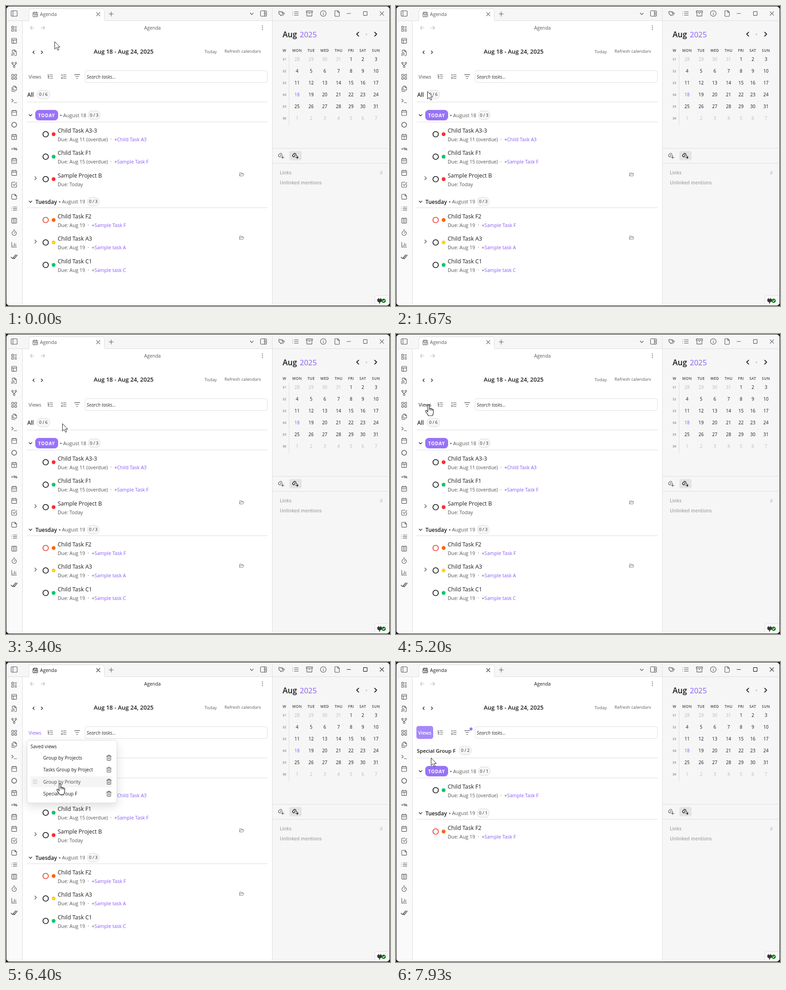
An HTML page that plays this animation: 847 px wide and 661 px high, repeating every 8000 ms.

```html
<!DOCTYPE html>
<html lang="en">
<head>
<meta charset="utf-8">
<title>Agenda</title>
<style>
  html, body { margin: 0; width: 100%; height: 100%; overflow: hidden; background: #1b1b1b; }
  svg { display: block; font-family: "Open Sans", "Noto Sans", sans-serif; }
  .icon { fill: none; stroke-linecap: round; stroke-linejoin: round; }
</style>
</head>
<body>
<svg id="stage" width="847" height="661" viewBox="0 0 847 661"></svg>
<script>
const INK = '#1c1c1c', GREY = '#565656', PALE = '#bbb', LINE = '#dedede', ACCENT = '#8a5cf5', PILL = '#9873f7';
const RED = '#fb2c36', GREEN = '#00c968', ORANGE = '#fb6514', YELLOW = '#fdcf2b';

// Drawing helpers; text is placed by the middle of its capitals
const text = (x, y, str, size, color = INK, weight = 400, extra = '') =>
  `<text x="${x}" y="${y + size * .36}" font-size="${size}" fill="${color}" font-weight="${weight}" ${extra}>${str}</text>`;
const centred = (x, y, str, size, color, weight, extra = '') =>
  text(x, y, str, size, color, weight, `text-anchor="middle" ${extra}`);
const rect = (x, y, w, h, fill, r = 0, stroke = 'none') =>
  `<rect x="${x}" y="${y}" width="${w}" height="${h}" fill="${fill}" rx="${r}" stroke="${stroke}"/>`;
const circle = (x, y, r, fill, stroke = 'none', width = 1) =>
  `<circle cx="${x}" cy="${y}" r="${r}" fill="${fill}" stroke="${stroke}" stroke-width="${width}"/>`;
const path = (d, color = LINE, width = 1) =>
  `<path class="icon" d="${d}" stroke="${color}" stroke-width="${width}"/>`;
const hline = (x1, x2, y) => path(`M${x1} ${y}H${x2}`);
const group = (id, body) => `<g id="${id}">${body}</g>`;

// Icons live on a 24 unit grid
const ring = (x, y, r) => `M${x - r} ${y}a${r} ${r} 0 1 0 ${2 * r} 0a${r} ${r} 0 1 0 ${-2 * r} 0`;
const box = (x, y, w, h, r = 2) =>
  `M${x + r} ${y}h${w - 2 * r}a${r} ${r} 0 0 1 ${r} ${r}v${h - 2 * r}a${r} ${r} 0 0 1 ${-r} ${r}` +
  `h${2 * r - w}a${r} ${r} 0 0 1 ${-r} ${-r}v${2 * r - h}a${r} ${r} 0 0 1 ${r} ${-r}z`;
const calendar = box(3, 4, 18, 18) + 'M3 10h18M8 2v4M16 2v4';
const ICONS = {
  rows: box(3, 3, 7, 7, 1) + box(3, 14, 7, 7, 1) + 'M14 4h7M14 9h7M14 15h7M14 20h7',
  layout: box(3, 3, 18, 18) + 'M3 9h18M9 9v12',
  search: 'M14 2v6h6M5 9V4a2 2 0 0 1 2-2h8l5 6v12a2 2 0 0 1-2 2h-4' + ring(8, 16, 4) + 'M5 19l-3 3',
  fork: ring(6, 6, 3) + ring(18, 6, 3) + ring(12, 19, 3) + 'M6 9c0 4 6 3 6 7c0-4 6-3 6-7',
  grid: box(3, 3, 7, 7, 1) + box(14, 3, 7, 7, 1) + box(3, 14, 7, 7, 1) + box(14, 14, 7, 7, 1),
  files: 'M15 2H10a2 2 0 0 0-2 2v11a2 2 0 0 0 2 2h9a2 2 0 0 0 2-2V7zM15 2v5h6M4 7v13a2 2 0 0 0 2 2h10',
  terminal: 'M3 17l6-5.5L3 6M12 19h9',
  calendar,
  days: calendar + 'M8 14h.1M12 14h.1M16 14h.1M8 18h.1M12 18h.1M16 18h.1',
  check: 'M21 11v8a2 2 0 0 1-2 2H5a2 2 0 0 1-2-2V5a2 2 0 0 1 2-2h11M8 11l4 4L22 4',
  note: 'M15 3H5a2 2 0 0 0-2 2v14a2 2 0 0 0 2 2h14a2 2 0 0 0 2-2V9zM15 3v6h6',
  list: 'M8 6h14M8 12h14M8 18h14M2 6h.1M2 12h.1M2 18h.1',
  columns: box(3, 3, 18, 18) + 'M9 3v18M15 3v18',
  timer: ring(12, 14, 8) + 'M10 2h4M12 14l3-3',
  chart: 'M3 3v18h18M8 17v-3M13 17V6M18 17V10',
  ticks: 'M1 14l5 5L18 5M9 17l3 3L23 6',
  left: box(2, 3, 20, 18, 3) + 'M8 3v18',
  right: box(2, 3, 20, 18, 3) + 'M15 3v18M18 7v10',
  clock: 'M21 8V6a2 2 0 0 0-2-2H5a2 2 0 0 0-2 2v14a2 2 0 0 0 2 2h4M3 10h6M8 2v4M16 2v4' + ring(16, 16, 6) + 'M16 13v3l2 1',
  close: 'M5 5l14 14M19 5L5 19',
  plus: 'M12 4v16M4 12h16',
  minus: 'M5 12h14',
  square: box(5, 5, 14, 14, 1),
  down: 'M5 9l7 7 7-7',
  prev: 'M15 5l-7 7 7 7',
  next: 'M9 5l7 7-7 7',
  back: 'M20 12H4M11 5l-7 7 7 7',
  forth: 'M4 12h16M13 5l7 7-7 7',
  tags: 'M2 5h7l8 7-7 8-8-8zM13 5l9 7-7 8M6 9h.1',
  archive: box(1, 3, 22, 5, 1) + 'M3 8v12a1 1 0 0 0 1 1h16a1 1 0 0 0 1-1V8M10 12h4',
  info: ring(12, 12, 10) + 'M12 11v6M12 7h.1',
  file: 'M14 2H6a2 2 0 0 0-2 2v16a2 2 0 0 0 2 2h12a2 2 0 0 0 2-2V8zM14 2v6h6',
  tree: 'M10 5h12M13 12h9M13 19h9M2 5h4M4 5v12a2 2 0 0 0 2 2h3M4 12h5',
  ordered: 'M10 5h12M10 12h12M10 19h12M3 4h2v5M3 15h3l-3 5h3',
  filter: 'M2 5h20M6 12h12M10 19h4',
  trash: 'M3 6h18M5 6v14a2 2 0 0 0 2 2h10a2 2 0 0 0 2-2V6M8 6V2h8v4M10 11v6M14 11v6',
  folder: 'M2 19V5a2 2 0 0 1 2-2h5l2 3h7a2 2 0 0 1 2 2v2M2 19l4-9h17l-3 10H3z',
  link: 'M9 16a5 5 0 0 1-6-8l3-3a5 5 0 0 1 8 1M10 14a5 5 0 0 1 0-6M14 9a5 5 0 0 1 2 4M13 19h9M18 15l4 4-4 4',
  unlink: 'M9 16a5 5 0 0 1-6-8l3-3a5 5 0 0 1 8 1M10 14a5 5 0 0 1 0-6M14 9a5 5 0 0 1 2 4M22 19h-9M17 15l-4 4 4 4'
};
const icon = (name, x, y, size = 14.5, color = GREY, width = 1.1) =>
  `<g transform="translate(${x - size / 2} ${y - size / 2}) scale(${size / 24})">` +
  path(ICONS[name], color, width * 24 / size) + '</g>';

const badge = (x, y, str, w = 27) =>
  rect(x + .5, y - 9.5, w, 19, '#f6f6f6', 8.5, '#dcdcdc') + centred(x + .5 + w / 2, y, str, 9.3, '#222', 500);

function windowFrame() {
  const tools = ['tags', 'list', 'archive', 'info', 'file'];
  const ribbon = ['rows', 'layout', 'search', 'fork', 'grid', 'files', 'terminal', 'calendar', '', 'calendar', '',
    'days', 'calendar', 'check', 'note', 'list', 'columns', 'timer', 'chart', 'ticks'];
  const ribbonY = i => 50.3 + i * 26.42;
  return rect(1, 1, 845, 659, '#fff', 7) +
    `<path d="M1 33V8a7 7 0 0 1 7-7H839a7 7 0 0 1 7 7V653a7 7 0 0 1-7 7H588V33Z" fill="#f6f6f6"/>` +
    `<path d="M1 33H36V660H8a7 7 0 0 1-7-7Z" fill="#fafafa"/>` +
    hline(1, 846, 32.5) + path('M36.5 33V660M587.5 1V660') +
    `<path d="M50.5 33V12a6 6 0 0 1 6-6H211a6 6 0 0 1 6 6V33" fill="#fff" stroke="${LINE}"/>` +
    icon('left', 18, 16.5, 16) + icon('plus', 232, 17.5, 14) + icon('down', 542, 17, 12) + icon('right', 568, 16.5, 16) +
    tools.map((name, i) => icon(name, 608 + i * 30.6, 16.5, 15)).join('') +
    ribbon.map((name, i) => name && icon(name, 18, ribbonY(i), 14.5, GREY, i == 19 ? 1.7 : 1.1)).join('') +
    circle(18, ribbonY(8), 5.3, 'none', GREY, 1.5) + centred(18, ribbonY(9) + 2, '1', 7, GREY, 600) +
    centred(18, ribbonY(10), '&lt;%', 9.5, GREY, 700);
}

const focusParts = color =>
  icon('clock', 64.5, 18.5, 13, color) + text(75, 18.5, 'Agenda', 10.5, color) + icon('close', 203.5, 18, 13, color) +
  centred(323, 48.5, 'Agenda', 10.4, color) +
  icon('minus', 756, 16.5, 14, color) + icon('square', 792.5, 16.5, 14, color) + icon('close', 829, 16.5, 14, color);

function toolbar() {
  return icon('back', 58, 48, 13, PALE) + icon('forth', 81, 48, 13, PALE) +
    [44, 48, 52].map(y => circle(565.5, y, 1, GREY)).join('') +
    icon('prev', 61, 102, 10, INK, 1.3) + icon('next', 79, 102, 10, INK, 1.3) +
    centred(259.5, 100.5, 'Aug 18 - Aug 24, 2025', 13, INK, 600) +
    text(438, 100, 'Today', 9.8, '#5f5f5f', 500) + text(482, 100, 'Refresh calendars', 9.7, '#5f5f5f', 500) +
    icon('tree', 97.5, 155.5, 13) + icon('ordered', 127.5, 155.5, 13) + icon('filter', 157, 155.5, 14) +
    rect(174.5, 142.5, 402, 26, '#fff', 4, LINE) +
    text(178, 156, 'Search tasks...', 10.3, '#333', 400, 'font-style="italic"') +
    hline(46, 577, 211.5);
}

function monthPanel() {
  const columns = [642, 673, 703, 733.5, 761, 787, 816];
  const names = ['MON', 'TUE', 'WED', 'THU', 'FRI', 'SAT', 'SUN'];
  let out = text(610, 63, 'Aug', 17.2, INK, 600) + text(648, 63, '2025', 16.5, ACCENT) +
    icon('prev', 776, 62, 15, INK, 1.8) + circle(795, 62.5, 1.6, PALE) + icon('next', 815, 62, 15, INK, 1.8) +
    centred(614, 98, 'W', 8, '#444', 600) + path('M624.5 107V263') +
    names.map((name, i) => centred(columns[i], 98, name, 8, '#444', 600, 'letter-spacing=".4"')).join('');
  for (let week = 0; week < 6; week++) {
    const y = 117.3 + week * 26;
    out += centred(614, y, 31 + week, 7.4, '#666');
    columns.forEach((x, i) => {
      const date = new Date(2025, 6, 28 + week * 7 + i), day = date.getDate();
      const inMonth = date.getMonth() == 7;
      out += centred(x, y, day, 10, !inMonth ? PALE : day == 18 ? ACCENT : INK);
    });
  }
  return out + hline(588, 846, 313.5) + hline(588, 846, 346.5) +
    rect(625, 319.5, 27, 20.5, '#e4e4e4', 4) + icon('unlink', 607.5, 329.5, 14) + icon('link', 638.5, 329.5, 14, INK, 1.3) +
    text(604, 367, 'Links', 10.2, '#a5a5a5', 600) + centred(828, 367, '0', 9.8, '#a5a5a5') +
    text(604, 389.5, 'Unlinked mentions', 10.1, '#a5a5a5', 600) +
    `<path d="M813.5 660V643a5 5 0 0 1 5-5H846" fill="#fafafa" stroke="${LINE}"/>` +
    '<path d="M819 645.5h2v-2h1.5v2h3v-2h1.5v2h2v3a4 4 0 0 1-4 4v3h-2v-3a4 4 0 0 1-4-4z" fill="#333"/>' +
    circle(833, 649.5, 4.7, '#0b7d18') + path('M831 649.5l1.5 1.7 2.6-3.2', '#fff', 1.2);
}

function dayHeader(y, isToday, date, count) {
  const x = isToday ? 119 : 116.5;
  const label = isToday
    ? rect(64.5, y - 11.5, 50.5, 23, PILL, 8) + text(71, y + .5, 'TODAY', 9.9, '#fff', 700, 'letter-spacing=".9"')
    : text(65, y + .5, 'Tuesday', 12, INK, 600);
  return icon('down', 54, y, 11, INK, 1.3) + label + circle(x + 2, y + .5, 1.5, GREY) +
    text(x + 7, y + .5, date, 11, GREY) + badge(isToday ? 181 : 179, y, count, 26) +
    hline(46, 577, y + (isToday ? 15 : 13.5));
}

function task(y, name, due, project, color, urgent, parent) {
  const projectX = due.length > 12 ? 239 : 189;
  return circle(87.5, y, 6, '#fff', urgent ? '#f0342c' : '#111', 1.7) + circle(105, y, 4.2, color) +
    text(114, y - 8, name, 12.4) + text(114, y + 11.5, due, 10.75, GREY) +
    (project ? circle(projectX - 7.5, y + 11, 1, '#aaa') +
      text(projectX, y + 11.5, `<tspan fill="${GREY}">+</tspan>${project}`, 10.65, ACCENT) : '') +
    (parent ? icon('next', 65, y - 2, 12, GREY, 1.4) + icon('folder', 519.5, y - 10.5, 10.5, '#777', .9) : '');
}

const f1 = y => task(y, 'Child Task F1', 'Due: Aug 15 (overdue)', 'Sample Task F', GREEN);
const f2 = y => task(y, 'Child Task F2', 'Due: Aug 19', 'Sample Task F', ORANGE, true);

const fullList = () =>
  text(47, 195.5, 'All', 11.6, INK, 600) + badge(68, 195, '0 / 6', 28) +
  dayHeader(240.5, true, 'August 18', '0 / 3') +
  task(282.5, 'Child Task A3-3', 'Due: Aug 11 (overdue)', 'Child Task A3', RED) +
  f1(332) + task(381.5, 'Sample Project B', 'Due: Today', '', RED, false, true) +
  dayHeader(431, false, 'August 19', '0 / 3') + f2(471.5) +
  task(521, 'Child Task A3', 'Due: Aug 19', 'Sample task A', YELLOW, false, true) +
  task(570.5, 'Child Task C1', 'Due: Aug 19', 'Sample task C', GREEN);

const filteredList = () =>
  rect(45, 141, 37, 28.5, '#a688fa', 5) + centred(63.5, 156, 'Views', 10.5, '#fff', 600) +
  circle(165.5, 147.5, 3.2, PILL) +
  text(46, 195.5, 'Special Group F', 11.5, INK, 600) + badge(139, 195, '0 / 2', 27) +
  dayHeader(240.5, true, 'August 18', '0 / 1') + f1(282.5) +
  dayHeader(333, false, 'August 19', '0 / 1') + f2(373.5);

const SAVED = ['Group by Projects', 'Tasks Group by Project', 'Group by Priority', 'Special Group F'];
const rowY = i => 211 + i * 26.4;
const popup = () =>
  `<rect x="46.5" y="172.5" width="198" height="138" rx="7" fill="#fff" stroke="#ddd"
    style="filter:drop-shadow(0 7px 10px rgba(0,0,0,.13))"/>` +
  text(54, 186, 'Saved views', 10.4, INK, 500) +
  group('hover', rect(54, -12, 181, 24, '#f5f5f5', 4) + path('M59.5 -3.5h9M59.5 0h9M59.5 3.5h9', PALE)) +
  SAVED.map((name, i) => `<g class="saved">${text(82, rowY(i), name, 10.4, 'currentColor', 500)}</g>` +
    icon('trash', 227, rowY(i), 13.5)).join('');

const stage = document.getElementById('stage');
stage.innerHTML = windowFrame() + toolbar() + monthPanel() +
  group('blurred', focusParts('#5a5a5a')) + group('focused', focusParts(INK)) +
  group('views', text(50, 156, 'Views', 10.5, 'currentColor', 500)) +
  group('full', fullList()) + group('filtered', filteredList()) + group('popup', popup()) +
  group('arrow', '<path d="M.5 .5V17l3.9-3.6 2.8 6.2 2.6-1.2-2.7-5.9H12Z" fill="#fff" stroke="#222"/>') +
  group('hand', `<path d="M-1.8 2C-1.8-.5 1.8-.5 1.8 2V8.5C3 7 5 7.6 5 9.3C6.2 8.2 8 8.8 8 10.3
    C9.2 9.4 10.5 10.2 10.5 11.7V17C10.5 20 9 21 8.6 24H-1C-1.3 21-5 18-6.7 14.5C-7.5 12.3-5.3 11.4-4 13L-1.8 15.5Z"
    fill="#fff" stroke="#222" stroke-width="1.2"/>` + path('M1.8 8.5V12M5 9.5V12.5M8 10.5V13', '#222', 1));

const byId = id => document.getElementById(id);
const show = (id, on) => byId(id).setAttribute('visibility', on ? 'visible' : 'hidden');

// Pointer tip: time, x, y
const ROUTE = [
  [0, 107, 78], [533, 152, 195], [800, 152, 195], [867, 147, 197], [1267, 90, 197], [1400, 90, 197],
  [1533, 76, 196], [1667, 69, 188], [1800, 84, 183], [1933, 102, 186], [2067, 105, 193], [2267, 80, 197],
  [2400, 84, 202], [2533, 98, 200], [2667, 104, 192], [2800, 94, 184], [2933, 80, 186], [3000, 76, 193],
  [3133, 84, 201], [3400, 124, 197], [4667, 124, 197], [5200, 72, 156], [6067, 72, 156],
  [6400, 119, 268], [6667, 115, 291], [7467, 115, 291], [7933, 77, 211], [8000, 77, 211]
];
function pointer(t) {
  const i = Math.max(1, ROUTE.findIndex(p => p[0] >= t));
  const [t0, x0, y0] = ROUTE[i - 1], [t1, x1, y1] = ROUTE[i];
  const k = (t - t0) / (t1 - t0);
  return [x0 + (x1 - x0) * k, y0 + (y1 - y0) * k];
}

const STEP = 1000 / 15;
function draw(now) {
  const t = Math.floor((now % 8000 + 4) / STEP) * STEP % 8000;
  const [x, y] = pointer(t);
  const focused = t > 5450, open = t > 5590 && t < 7060, filtered = t > 7120, hand = t > 5060 && t < 7060;

  show('blurred', !focused);
  show('focused', focused);
  show('full', !filtered);
  show('filtered', filtered);
  show('views', !filtered);
  byId('views').style.color = focused ? ACCENT : hand ? INK : GREY;

  const row = Math.floor((y - 198) / 26.4);
  byId('popup').setAttribute('display', open ? 'inline' : 'none');
  byId('popup').setAttribute('opacity', Math.min(1, (t - 5530) / 200));
  show('hover', open && row >= 0);
  byId('hover').setAttribute('transform', `translate(0 ${rowY(row)})`);
  document.querySelectorAll('.saved').forEach((el, i) => el.style.color = i == row ? '#4a4a4a' : INK);

  show('arrow', !hand);
  show('hand', hand);
  byId(hand ? 'hand' : 'arrow').setAttribute('transform', `translate(${x} ${y})`);
  requestAnimationFrame(() => draw(performance.now() - start));
}
const start = performance.now();
draw(0);
</script>
</body>
</html>
```
